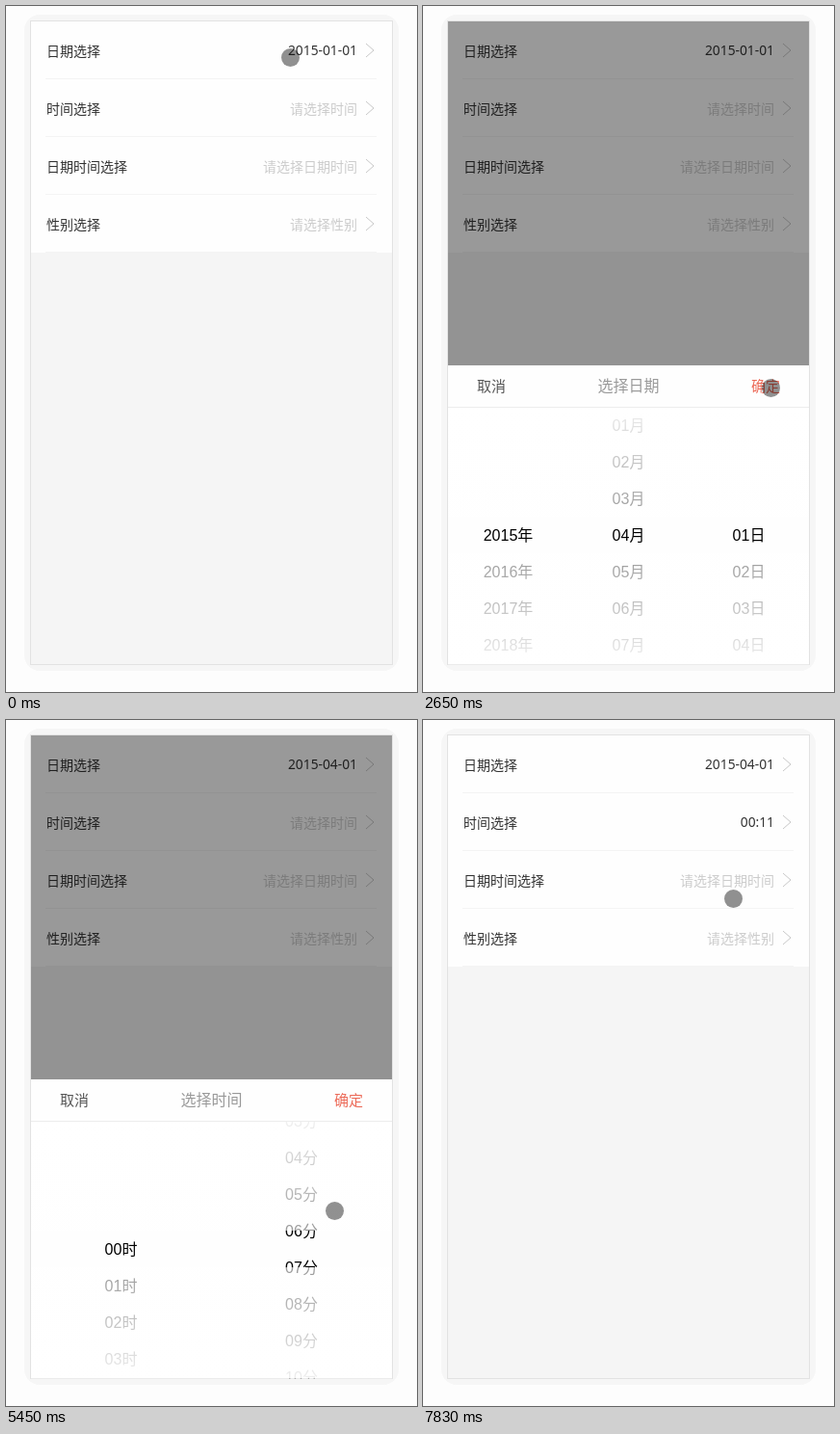
Animation, 427 px wide and 712 px high, one loop 8 s. Source, as an HTML page:

```html
<!DOCTYPE html>
<html lang="zh">
<head>
<meta charset="utf-8">
<title>Picker</title>
<style>
html, body { margin: 0; width: 100%; height: 100%; overflow: hidden; background: #fdfdfd; }
svg { display: block; width: 100vw; height: 100vh; }
text { font-family: "Noto Sans CJK SC", "Noto Sans CJK", sans-serif; font-size: 14px; fill: #333; }
.hint { fill: #ccc; }
.value { font-family: "Noto Sans", "Open Sans", sans-serif; font-size: 13.8px; }
.action { font-size: 15px; fill: #555; }
.ok { fill: #ec6a58; }
.title { font-size: 16px; fill: #999; text-anchor: middle; }
.wheel text { font-family: "Liberation Sans", "Noto Sans CJK SC", "Noto Sans CJK", sans-serif; font-size: 16px; fill: #000; text-anchor: middle; }
</style>
</head>
<body>
<svg viewBox="0 0 427 712">
  <defs>
    <clipPath id="screen"><rect x="26" y="16" width="375.5" height="667.5"/></clipPath>
    <clipPath id="wheels"><rect x="26" y="417" width="376" height="267"/></clipPath>
    <linearGradient id="fadeDown" x2="0" y2="1">
      <stop offset="0" stop-color="#fff" stop-opacity=".6"/>
      <stop offset="1" stop-color="#fff" stop-opacity=".94"/>
    </linearGradient>
    <linearGradient id="fadeUp" href="#fadeDown" x2="0" y1="1" y2="0"/>
  </defs>
  <rect x="19" y="9" width="389" height="681" rx="16" fill="#f6f6f6"/>
  <rect x="25.5" y="15.5" width="376" height="668" fill="#f5f5f5" stroke="#e2e2e2"/>
  <g clip-path="url(#screen)">
    <rect x="26" y="16" width="375" height="240" fill="#fefefe"/>
    <g id="form"></g>
    <rect id="shade" x="26" y="16" width="375" height="668"/>
    <g id="popup">
      <rect x="26" y="373" width="375" height="311" fill="#fefefe"/>
      <path d="M26 416.5H401" stroke="#ededed"/>
      <text class="action" x="56" y="400">取消</text>
      <text class="title" id="title" x="213.5" y="400"></text>
      <text class="action ok" x="341" y="400">确定</text>
      <g clip-path="url(#wheels)">
        <g id="dateWheels"></g>
        <g id="timeWheels"></g>
      </g>
      <rect x="26" y="417" width="375" height="113" fill="url(#fadeUp)"/>
      <rect x="26" y="568" width="375" height="116" fill="url(#fadeDown)"/>
    </g>
  </g>
  <circle id="touch" r="9.5" fill-opacity=".43"/>
</svg>
<script>
// The picture advances in even ticks, as a screen recording does
const LOOP = 8000, TICK = 147.6, LAST = 53;
const ROW = 38, POPUP = 311;

const $ = id => document.getElementById(id);
const ramp = (t, from, to) => Math.max(0, Math.min(1, (t - from) / (to - from)));
const ease = (t, from, to) => {
  const f = ramp(t, from, to);
  return f * f * (3 - 2 * f);
};
const shift = (el, y) => el.setAttribute('transform', `translate(0 ${y})`);

function add(parent, tag, attrs, text = '') {
  const el = document.createElementNS('http://www.w3.org/2000/svg', tag);
  for (const name in attrs) el.setAttribute(name, attrs[name]);
  el.textContent = text;
  parent.appendChild(el);
  return el;
}

// Adds a form row and returns its value setter
function field(label, i) {
  const form = $('form'), y = 60 * i;
  add(form, 'text', { x: 42, y: y + 52 }, label + '选择');
  add(form, 'path', { d: `M374 ${y + 39}l8 7l-8 7`, fill: 'none', stroke: '#c8c8c8' });
  add(form, 'path', { d: `M41 ${y + 75.5}H385`, stroke: '#f4f4f4' });
  const hint = add(form, 'text', { x: 365, y: y + 52, class: 'hint', 'text-anchor': 'end' });
  const value = add(form, 'text', { x: 365, y: y + 51, class: 'value', 'text-anchor': 'end' });
  return text => {
    value.textContent = text;
    hint.textContent = text ? '' : '请选择' + label;
  };
}

function wheel(parent, x, first, last, unit) {
  const g = add(parent, 'g', { class: 'wheel' });
  for (let n = first; n <= last; n++) {
    add(g, 'text', { x, y: 555 + (n - first) * ROW }, String(n).padStart(2, '0') + unit);
  }
  return g;
}

const [setDate, setTime, setBoth, setGender] = ['日期', '时间', '日期时间', '性别'].map(field);
setBoth('');
setGender('');

wheel($('dateWheels'), 88.5, 2015, 2018, '年');
const months = wheel($('dateWheels'), 213.5, 1, 12, '月');
wheel($('dateWheels'), 338.5, 1, 4, '日');
wheel($('timeWheels'), 119.5, 0, 3, '时');
const minutes = wheel($('timeWheels'), 307, 2, 20, '分');

// Finger gestures: from tick, to tick, end point
const home = [295.5, 53.5];
const gestures = [
  [1, 8, 207, 573],
  [8, 12, 196.5, 470],
  [12, 16, 385.5, 378],
  [16, 18, 361.5, 396.5],
  [20, 24, 336.5, 105.5],
  [26, 30, 323.5, 603.5],
  [31, 43, 359.5, 415.5],
  [44, 47, 353, 398.5],
  [49, 53, 322.5, 185.5]
];

function finger(k) {
  let [x, y] = home;
  for (const [from, to, endX, endY] of gestures) {
    const f = ease(k, from, to);
    x += (endX - x) * f;
    y += (endY - y) * f;
  }
  return [x, y];
}

function draw(ms) {
  const k = Math.min(LAST, Math.floor((ms + 15) / TICK));
  const isTime = k > 22;
  const open = isTime
    ? ramp(k, 25, 27) - ramp(k, 48, 50)
    : ramp(k, 1, 3) - ramp(k, 19, 21);

  setDate(k < 20 ? '2015-01-01' : '2015-04-01');
  setTime(k < 49 ? '' : '00:11');

  $('shade').setAttribute('fill-opacity', .4 * open);
  shift($('popup'), POPUP * (1 - open));
  $('title').textContent = isTime ? '选择时间' : '选择日期';
  $('dateWheels').style.display = isTime ? 'none' : '';
  $('timeWheels').style.display = isTime ? '' : 'none';
  shift(months, -3 * ROW * ease(k, 8, 12.25));
  shift(minutes, -9 * ROW * ease(k, 31, 43));

  const [x, y] = finger(k);
  $('touch').setAttribute('cx', x);
  $('touch').setAttribute('cy', y);
}

const start = performance.now();
function loop() {
  draw((performance.now() - start) % LOOP);
  requestAnimationFrame(loop);
}
loop();
</script>
</body>
</html>
```
